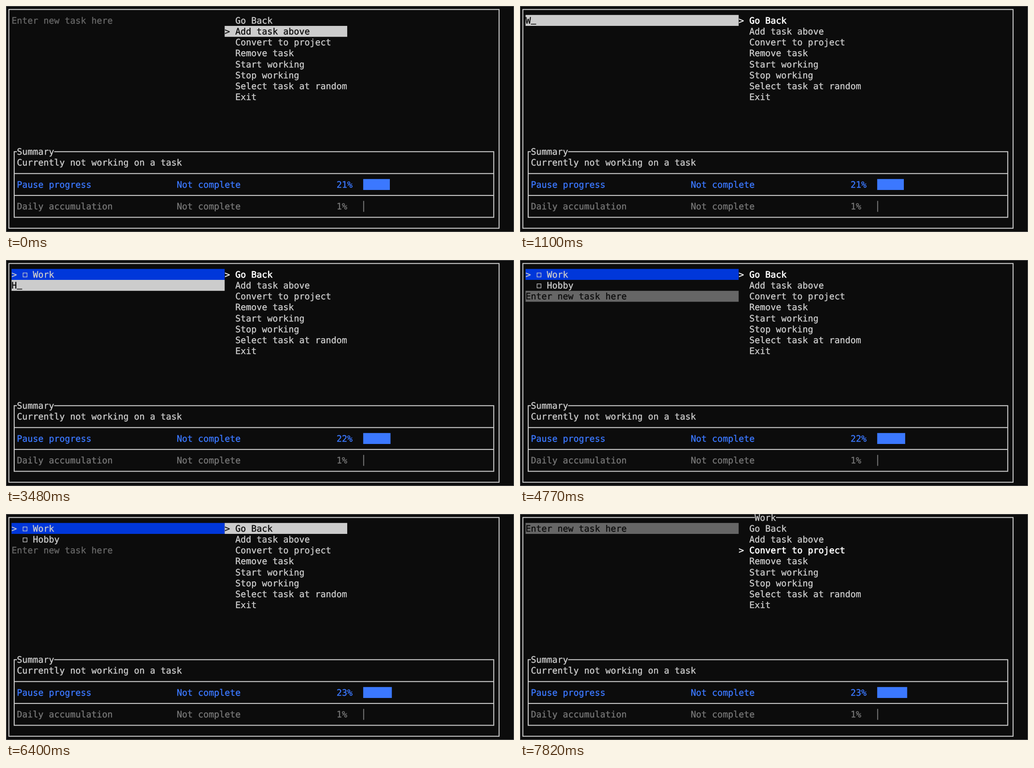
An HTML page with a canvas for the animation above (8 s loop, 1121 by 500 pixels).

```html
<!DOCTYPE html>
<html lang="en">
<head>
<meta charset="utf-8">
<title>Task list</title>
<style>
  html, body { margin: 0; width: 100%; height: 100%; overflow: hidden; background: #0c0c0c; }
  canvas { display: block; }
</style>
</head>
<body>
<canvas id="stage" width="1121" height="500"></canvas>
<script>
const ctx = document.getElementById('stage').getContext('2d');
const LOOP = 8000;
const CELL = 11.758;
const ROW = 24.2;
const LINE = 2.1;
const BLACK = '#0c0c0c', GREY = '#cccccc', WHITE = '#ffffff', DIM = '#666666';
const FAINT = '#767676', BLUE = '#3b78ff', NAVY = '#0037da';
const MENU = ['Go Back', 'Add task above', 'Convert to project', 'Remove task',
  'Start working', 'Stop working', 'Select task at random', 'Exit'];

// Each step changes part of the state; bar counts eighths of a cell.
const STEPS = [
  [0, { focus: 'menu', menu: 1, tasks: [], task: 0, input: '', title: '', bar: 40, percent: 21 }],
  [120, { menu: 0 }],
  [370, { focus: 'input' }],
  [1100, { input: 'W' }],
  [1380, { input: 'Wo' }],
  [1780, { input: 'Wor' }],
  [1930, { input: 'Workj' }],
  [2360, { input: 'Work' }],
  [2800, { tasks: ['Work'], input: '', bar: 41, percent: 22 }],
  [3480, { input: 'H' }],
  [3790, { input: 'Ho', bar: 42 }],
  [4040, { input: 'Hob' }],
  [4180, { input: 'Hobb' }],
  [4330, { input: 'Hobby' }],
  [4770, { tasks: ['Work', 'Hobby'], input: '' }],
  [5610, { focus: 'list' }],
  [5730, { bar: 43, percent: 23 }],
  [5850, { task: 1 }],
  [6250, { task: 0 }],
  [6400, { focus: 'menu' }],
  [6700, { menu: 1, bar: 44 }],
  [6850, { menu: 2 }],
  [7420, { focus: 'input', tasks: [], title: 'Work' }],
  [7820, { bar: 45 }]
];

const colX = col => 12.2 + col * CELL;
const rowTop = row => 19.8 + row * ROW;
const rowMid = row => rowTop(row + 0.5);

function stateAt(time) {
  return Object.assign({}, ...STEPS.filter(([start]) => start <= time).map(([, change]) => change));
}

function rect(x, y, w, h, color) {
  ctx.fillStyle = color;
  ctx.fillRect(x, y, w, h);
}

// A thin outline gives the medium weight of the terminal type.
function text(string, col, row, color, strong = false) {
  const x = colX(col), y = rowMid(row) + 6.9;
  ctx.fillStyle = ctx.strokeStyle = color;
  ctx.lineWidth = strong ? 0.7 : 0.4;
  ctx.fillText(string, x, y);
  ctx.strokeText(string, x, y);
}

function highlight(col, row, cells, color) {
  rect(colX(col), rowTop(row), cells * CELL, ROW, color);
}

function box(firstCol, firstRow, lastCol, lastRow) {
  const x = colX(firstCol + 0.5), y = rowMid(firstRow);
  ctx.strokeStyle = GREY;
  ctx.lineWidth = LINE;
  ctx.strokeRect(x, y, colX(lastCol + 0.5) - x, rowMid(lastRow) - y);
}

function borderTitle(string, col, row) {
  rect(colX(col), rowMid(row) - 4, string.length * CELL, 8, BLACK);
  text(string, col, row, GREY);
}

function drawTasks(state) {
  state.tasks.forEach((name, row) => {
    if (row === state.task) {
      highlight(0, row, 40, state.focus === 'list' ? BLUE : NAVY);
      text('>', 0, row, GREY);
    }
    ctx.strokeStyle = GREY;
    ctx.lineWidth = 1.3;
    ctx.strokeRect(37.6, rowMid(row) - 3.2, 8.8, 8.8);
    text(name, 4, row, GREY);
  });
}

function drawInput(state) {
  const row = state.tasks.length, focused = state.focus === 'input';
  if (focused) highlight(0, row, 40, state.input ? GREY : DIM);
  if (state.input) {
    text(state.input, 0, row, BLACK);
    rect(colX(state.input.length), rowMid(row) + 7.5, CELL, 1.6, BLACK);
  } else {
    text('Enter new task here', 0, row, focused ? BLACK : DIM);
  }
}

function drawMenu(state) {
  const focused = state.focus === 'menu';
  MENU.forEach((label, row) => {
    const current = row === state.menu;
    const color = !current ? GREY : focused ? BLACK : WHITE;
    if (current) {
      if (focused) highlight(40, row, 23, GREY);
      text('>', 40, row, color);
    }
    text(label, 42, row, color, current && !focused);
  });
}

function drawSummary(state) {
  box(0, 12, 90, 18);
  for (const row of [14, 16]) rect(colX(0.5), rowMid(row) - LINE / 2, 90 * CELL, LINE, GREY);
  borderTitle('Summary', 1, 12);
  text('Currently not working on a task', 1, 13, GREY);
  const progress = [
    ['Pause progress', state.percent, 15, state.bar, BLUE],
    ['Daily accumulation', 1, 17, 1.4, FAINT]
  ];
  for (const [label, percent, row, eighths, color] of progress) {
    text(label, 1, row, color);
    text('Not complete', 31, row, color);
    text(percent + '%', 61, row, color);
    highlight(66, row, eighths / 8, color);
  }
}

function draw(state) {
  rect(0, 0, 1121, 500, BLACK);
  ctx.strokeStyle = DIM;
  ctx.lineWidth = 1;
  ctx.strokeRect(0.5, 0.5, 1120, 499);
  box(-1, -1, 91, 19);
  if (state.title) borderTitle(state.title, 43, -1);
  drawTasks(state);
  drawInput(state);
  drawMenu(state);
  drawSummary(state);
}

ctx.font = '19.53px "DejaVu Sans Mono", monospace';
ctx.textRendering = 'geometricPrecision';
ctx.lineJoin = 'miter';

const began = performance.now();
function tick() {
  draw(stateAt((performance.now() - began) % LOOP));
  requestAnimationFrame(tick);
}
tick();
</script>
</body>
</html>
```
